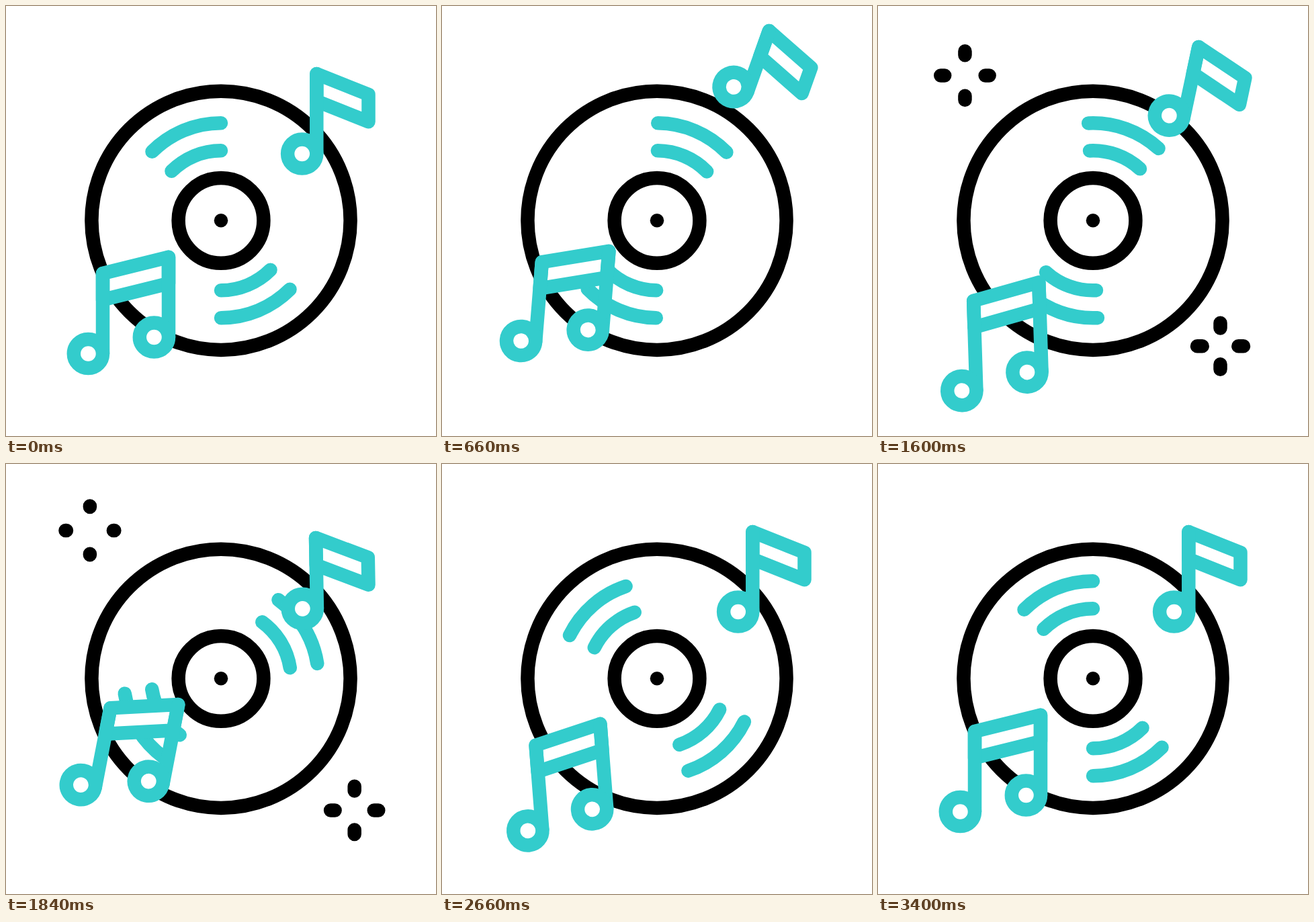
These frames come from a looping animation (640x640 px, 3600 ms). An HTML page:

```html
<!DOCTYPE html>
<html lang="en">
<head>
<meta charset="utf-8">
<title>Spinning record</title>
<style>
  html, body { margin: 0; width: 100%; height: 100%; overflow: hidden; background: #fff; }
  svg { display: block; width: 100vw; height: 100vh; }
  svg * { stroke-width: 20.5; stroke-linecap: round; stroke-linejoin: round; }
  .ink { stroke: #000; fill: none; }
  .teal { stroke: #3cc; fill: #fff; }
  .arc { fill: none; }
</style>
</head>
<body>
<svg viewBox="0 0 640 640">
  <g class="ink">
    <circle cx="320" cy="319.3" r="192.6"/>
    <circle cx="320" cy="319.3" r="63.4"/>
    <path d="M320 319.3h0"/>
  </g>
  <g id="spin" class="teal"></g>
  <g id="sparkles" class="ink"></g>
  <g id="notes" class="teal"></g>
</svg>
<script>
const LOOP = 3600, SPIN = 3400, LAG = 365;
const CX = 320, CY = 319.3;
const $ = id => document.getElementById(id);

function add(parent, tag, attrs) {
  const el = document.createElementNS('http://www.w3.org/2000/svg', tag);
  for (const k in attrs) el.setAttribute(k, attrs[k]);
  return parent.appendChild(el);
}

const smooth = u => u * u * (3 - 2 * u);
const linear = u => u;

// Value of a [time, value] track at time t
function track(keys, t, ease = smooth) {
  if (t <= keys[0][0]) return keys[0][1];
  for (let i = 1; i < keys.length; i++) {
    const [t0, a] = keys[i - 1], [t1, b] = keys[i];
    if (t < t1) return a + (b - a) * ease((t - t0) / (t1 - t0));
  }
  return keys[keys.length - 1][1];
}

// Cubic bezier easing (.338, 0, .408, 1)
function spinEase(x) {
  let lo = 0, hi = 1;
  for (let i = 0; i < 24; i++) {
    const s = (lo + hi) / 2, r = 1 - s;
    if (3 * s * r * r * .338 + 3 * s * s * r * .408 + s * s * s < x) lo = s;
    else hi = s;
  }
  return smooth(lo);
}

const LIFT = [[145, 0], [628, -64], [1092, 63], [1560, -39.5], [2030, 35], [2580, 0]];
const TILT = [[145, 0], [628, 20], [1092, -6], [1560, 12.5], [2030, -8.5], [2580, 0]];
const STEM = [[430, 0], [715, -25], [1260, 14], [1740, -16], [2280, 6.5], [2600, 0]];
const DRIFT = [[800, 0], [1880, 28]];
const OUTER = [[800, 26], [1140, 34], [1600, 36.2], [1880, 36.5]];
const INNER = [[1200, 26.5], [1760, 31.7], [1880, 36.5]];

for (const r of [145, 104])
  for (const side of [1, -1]) {
    const k = r * Math.SQRT1_2 * side;
    add($('spin'), 'path', {
      class: 'arc',
      d: `M${CX} ${CY - r * side}A${r} ${r} 0 0 0 ${CX - k} ${CY - k}`
    });
  }

// stems: [x, top y, head centre y]; pivot: centre of rotation
function makeNote(pivot, flag, stems, lag) {
  const g = add($('notes'), 'g', {});
  add(g, 'path', { d: flag });
  const lines = stems.map(([x, y]) => add(g, 'line', { x1: x, y1: y, x2: x }));
  const heads = stems.map(([x]) => add(g, 'circle', { cx: x - 21.6, r: 21.6 }));
  return time => {
    const t = time - lag, grow = track(STEM, t);
    stems.forEach(([, , y], i) => {
      lines[i].setAttribute('y2', y + grow);
      heads[i].setAttribute('cy', y + grow);
    });
    g.setAttribute('transform',
      `translate(0 ${track(LIFT, t)}) rotate(${track(TILT, t)} ${pivot})`);
  };
}

// dir: -1 drifts up-left, 1 drifts down-right
function makeSparkle(x, y, dir, lag) {
  const path = add($('sparkles'), 'path', {});
  return time => {
    const t = time - lag;
    if (t < 800 || t >= 1880) return path.setAttribute('d', '');
    const d = dir * track(DRIFT, t), a = track(INNER, t, linear), b = track(OUTER, t, linear);
    const cx = x + d, cy = y + d;
    path.setAttribute('d', [[1, 0], [-1, 0], [0, 1], [0, -1]].map(([i, j]) =>
      `M${cx + a * i} ${cy + a * j}L${cx + b * i} ${cy + b * j}`).join(''));
  };
}

const parts = [
  makeSparkle(152.8, 126.8, -1, 0),
  makeSparkle(499.5, 496.3, 1, LAG),
  makeNote('480 171', 'M462.3 101L539.5 131.7V172.3L462.3 141.5Z', [[462.3, 101, 220]], 0),
  makeNote('171 456', 'M144 398L242 373.8V413L144 437.3Z',
    [[144, 398, 517.5], [242, 373.8, 493]], LAG)
];

function draw(now) {
  const t = now % LOOP;
  $('spin').setAttribute('transform',
    `rotate(${360 * spinEase(Math.min(1, t / SPIN))} ${CX} ${CY})`);
  parts.forEach(move => move(t));
}

const start = performance.now();
function tick() {
  draw(performance.now() - start);
  requestAnimationFrame(tick);
}
tick();
</script>
</body>
</html>
```
